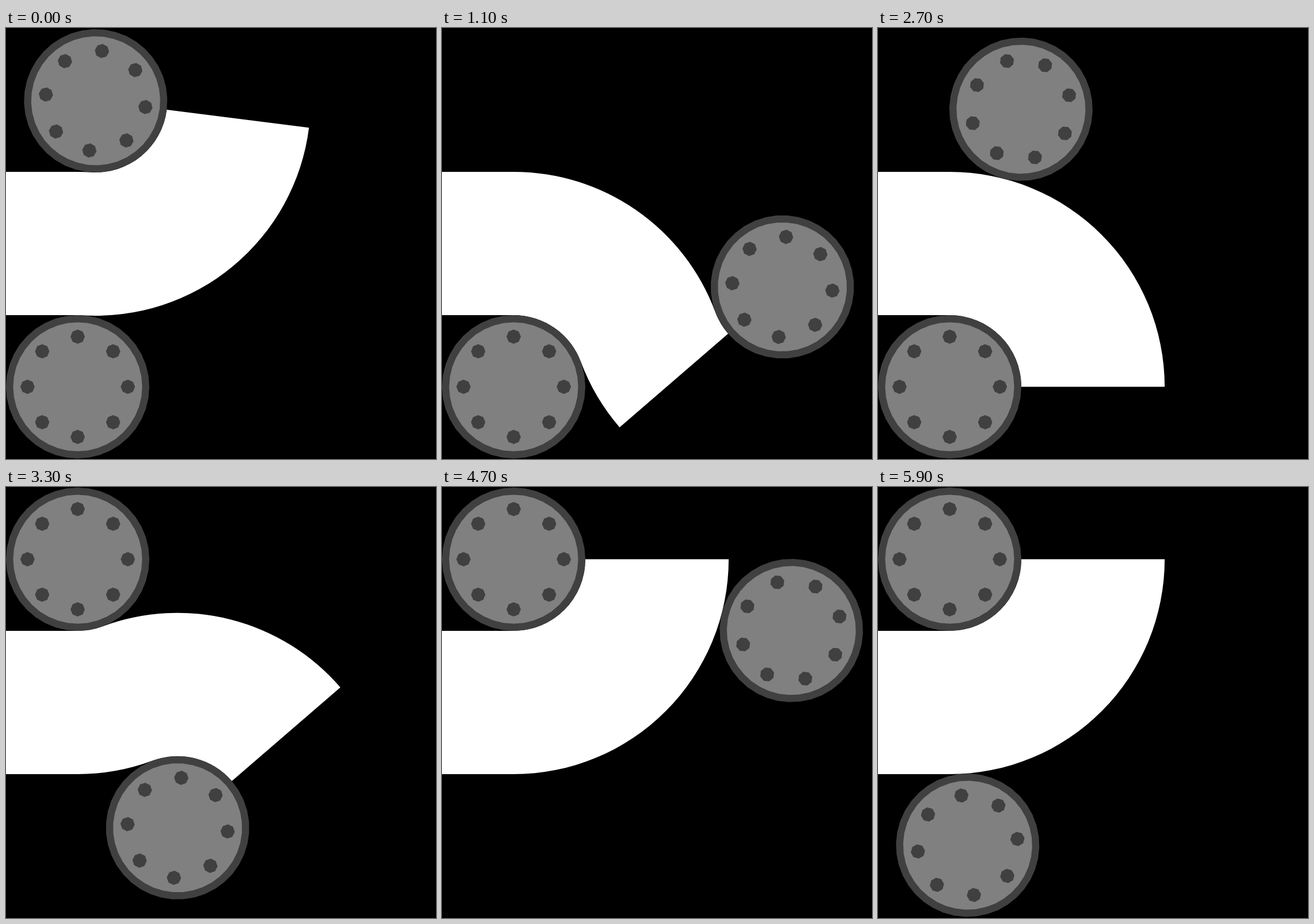
Recreate the animation shown at these times as an HTML page with a canvas. Size 747x749 px, loop 6000 ms.

```html
<!DOCTYPE html>
<html lang="en">
<head>
<meta charset="utf-8">
<title>Rolling wheels</title>
<style>
  html, body { margin: 0; width: 100%; height: 100%; overflow: hidden; background: #000; }
  canvas { display: block; }
</style>
</head>
<body>
<canvas id="stage" width="747" height="749"></canvas>
<script>
const W = 747, H = 749;
const R = W / 6;             // wheel radius; the band is 2R wide
const MID = H / 2;
const STEP = 100, STEPS = 60, HALF = STEPS / 2;
const QUARTER = Math.PI / 2;
const FIXED = { x: R, y: MID + 2 * R };
const START = [0.04, 2 / 75]; // small phase lead of each half cycle
const ctx = document.getElementById('stage').getContext('2d');

// Centre of a wheel that has rolled by angle a around the fixed one.
const orbit = a => ({ x: FIXED.x + 4 * R * Math.sin(a), y: FIXED.y - 4 * R * Math.cos(a) });

function polygon(x, y, r, sides, color) {
  ctx.beginPath();
  for (let i = 0; i < sides; i++) {
    const a = i * 2 * Math.PI / sides;
    ctx.lineTo(x + r * Math.cos(a), y + r * Math.sin(a));
  }
  ctx.fillStyle = color;
  ctx.fill();
}

function wheel({ x, y }, turn) {
  ctx.save();
  ctx.translate(x, y);
  ctx.rotate(turn);
  polygon(0, 0, R, 40, '#404040');
  polygon(0, 0, 0.9 * R, 40, '#808080');
  for (let i = 0; i < 8; i++) {
    const a = i * Math.PI / 4;
    polygon(0.7 * R * Math.cos(a), 0.7 * R * Math.sin(a), 0.1 * R, 8, '#404040');
  }
  ctx.restore();
}

// Bends by a around the fixed wheel, then the rest of 90° around the other one.
function band(a) {
  const m = orbit(a);
  ctx.beginPath();
  ctx.moveTo(-1, MID - R);
  ctx.arc(FIXED.x, FIXED.y, 3 * R, -QUARTER, a - QUARTER);
  if (a < QUARTER) {
    ctx.arc(m.x, m.y, R, QUARTER + a, 2 * a, true);
    ctx.arc(m.x, m.y, 3 * R, 2 * a, QUARTER + a);
  }
  ctx.arc(FIXED.x, FIXED.y, R, a - QUARTER, -QUARTER, true);
  ctx.lineTo(-1, MID + R);
  ctx.fillStyle = '#fff';
  ctx.fill();
}

function draw(time) {
  const step = Math.floor(time / STEP) % STEPS;
  const half = Math.floor(step / HALF);
  const phase = START[half] + (step % HALF) / 15; // 0..1 roll out, 1..2 roll back
  const angle = QUARTER * (1 - Math.abs(1 - phase));

  ctx.setTransform(1, 0, 0, 1, 0, 0);
  ctx.fillStyle = '#000';
  ctx.fillRect(0, 0, W, H);
  if (half) ctx.setTransform(1, 0, 0, -1, 0, H); // second half is mirrored
  band(phase < 1 ? angle : QUARTER);
  wheel(FIXED, 0);
  wheel(orbit(angle), 2 * angle);
}

function tick(now) {
  draw(now);
  requestAnimationFrame(tick);
}
draw(0);
requestAnimationFrame(tick);
</script>
</body>
</html>
```
